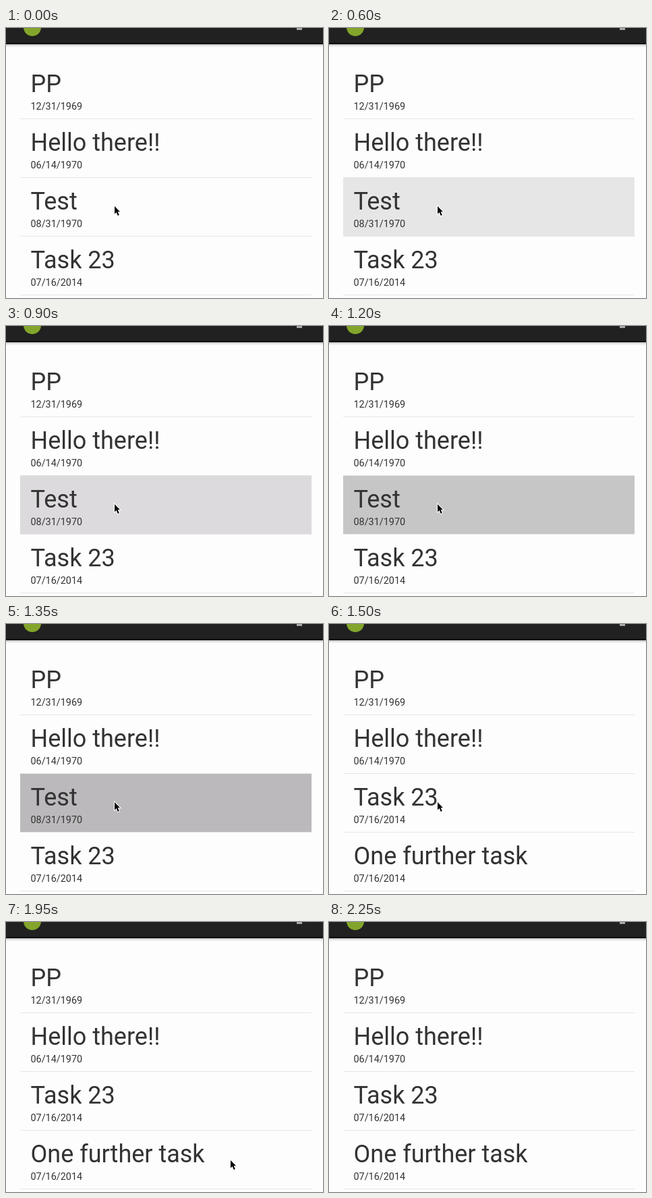
These frames come from a looping animation (470x400 px, 2640 ms). An HTML page with a canvas:

```html
<!DOCTYPE html>
<html lang="en">
<head>
<meta charset="utf-8">
<title>Task list</title>
<style>
html, body { margin: 0; width: 100%; height: 100%; overflow: hidden; background: #fdfdfd; }
canvas { display: block; }
</style>
</head>
<body>
<canvas id="stage" width="470" height="400"></canvas>
<script>
const ctx = document.getElementById('stage').getContext('2d');
const LOOP = 2640, ROW = 87;
const before = [['PP', '12/31/1969'], ['Hello there!!', '06/14/1970'],
  ['Test', '08/31/1970'], ['Task 23', '07/16/2014']];
const after = [before[0], before[1], before[3], ['One further task', '07/16/2014']];

// [start time, value] steps
const shades = [[0, null], [600, '#e6e6e6'], [900, '#dcdadc'], [1200, '#c6c6c6'],
  [1350, '#bbb9bb'], [1500, null]];
const pointer = [[0, [161, 264]], [1800, [165, 264]], [1950, [333, 353]],
  [2100, [375, 387]], [2250, null]];
const at = (steps, t) => steps.filter(s => s[0] <= t).pop()[1];

const arrow = new Path2D('M0 0V11.4L2.6 9L4.8 14L6.8 13.1L4.6 8.2H8Z');

function rect(color, x, y, w, h) {
  ctx.fillStyle = color;
  ctx.fillRect(x, y, w, h);
}

function text(str, size, y) {
  ctx.font = size + 'px Roboto, sans-serif';
  ctx.fillStyle = '#333';
  ctx.fillText(str, 36.5, y);
}

function drawBar() {
  rect('#212121', 0, 0, 470, 22);
  rect('#0e0e0e', 0, 22, 470, 2);
  const shadow = ctx.createLinearGradient(0, 24, 0, 29);
  shadow.addColorStop(0, '#b0b0b0');
  shadow.addColorStop(0.4, '#e6e6e6');
  shadow.addColorStop(1, '#fdfdfd');
  rect(shadow, 0, 24, 470, 5);
  rect('#a8a8a8', 431, 0, 8, 3);
  ctx.fillStyle = '#83a52b';
  ctx.beginPath();
  ctx.arc(39, -1, 13, 0, 7);
  ctx.fill();
}

function drawPointer([x, y]) {
  ctx.save();
  ctx.translate(x, y);
  ctx.strokeStyle = '#fff';
  ctx.lineWidth = 2;
  ctx.stroke(arrow);
  ctx.fillStyle = '#000';
  ctx.fill(arrow);
  ctx.restore();
}

function draw(t) {
  rect('#fdfdfd', 0, 0, 470, 400);
  drawBar();
  const shade = at(shades, t), pos = at(pointer, t);
  if (shade) rect(shade, 21, 222, 432, 86);
  (t < 1500 ? before : after).forEach(([title, date], i) => {
    const y = i * ROW;
    text(title, 36, 95 + y);
    text(date, 14.4, 121 + y);
    rect('#e6e6e6', 21, 134 + y, 432, 1);
  });
  if (pos) drawPointer(pos);
}

const start = performance.now();
function tick() {
  draw((performance.now() - start) % LOOP);
  requestAnimationFrame(tick);
}
tick();
</script>
</body>
</html>
```
